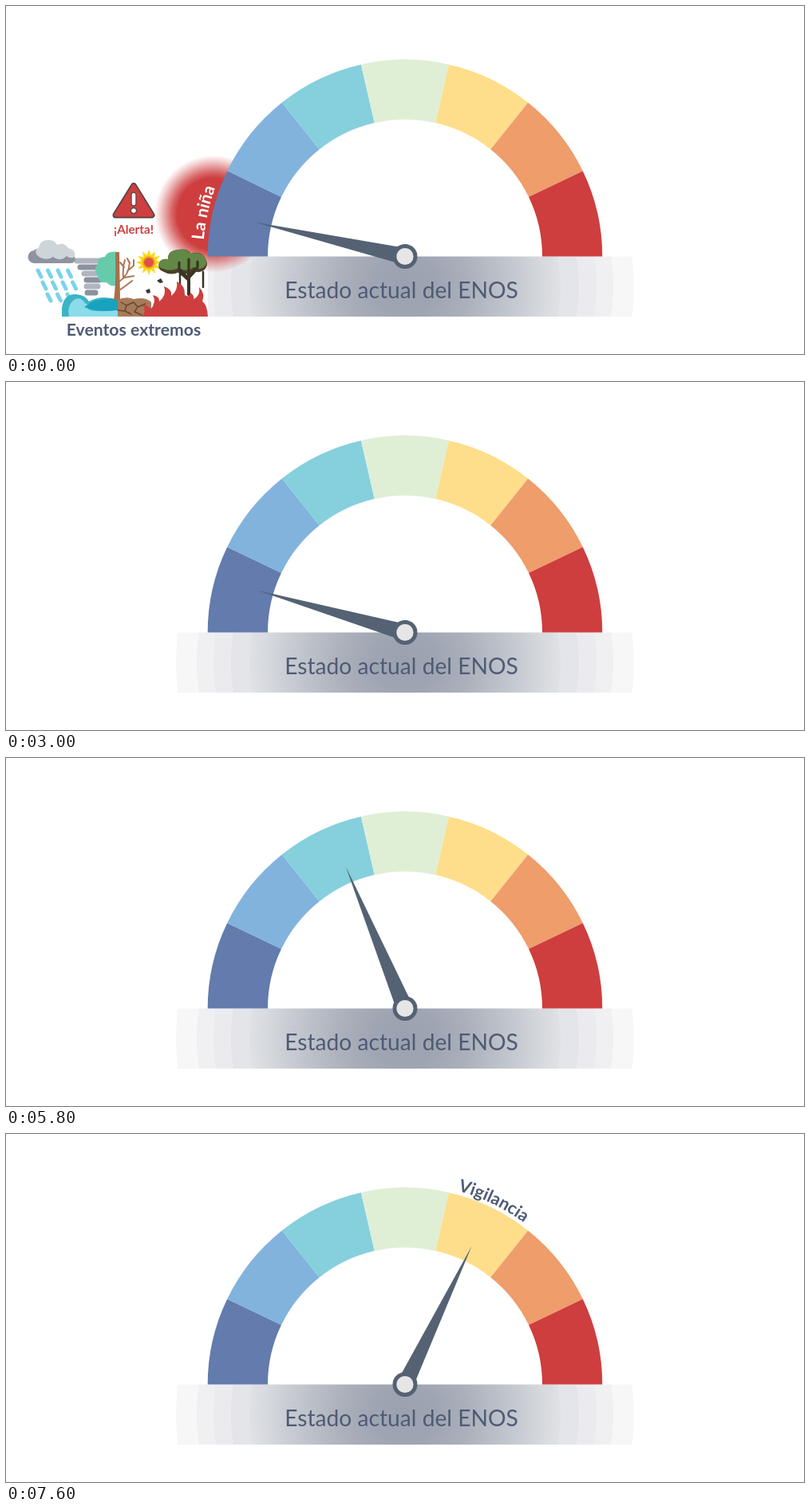
These frames come from a looping animation (1000x437 px, 8000 ms). An HTML page with a canvas:

```html
<!DOCTYPE html>
<html lang="es">
<head>
<meta charset="utf-8">
<title>Estado actual del ENOS</title>
<style>
html, body { margin: 0; width: 100%; height: 100%; overflow: hidden; background: #fff; }
canvas { display: block; width: 1000px; height: 437px; }
</style>
</head>
<body>
<canvas id="stage"></canvas>
<script>
const W = 1000, H = 437, LOOP = 8000;
const CX = 500, CY = 314.5, OUTER = 247.3, INNER = 172;
const SEG = 180 / 7;
const RED = '#ce3e3e', SLATE = '#546273', INK = '#4e5b74';
const COLORS = ['#637bad', '#82b3dd', '#86cfdd', '#dfefd5', '#fede8b', '#ee9d6b', RED];
const FONT = 'Lato, "Open Sans", sans-serif';

const canvas = document.getElementById('stage');
const dpr = window.devicePixelRatio || 1;
canvas.width = W * dpr;
canvas.height = H * dpr;
const ctx = canvas.getContext('2d');
ctx.scale(dpr, dpr);

// Each stop: the needle leaves for the next segment at `leave`.
const STOPS = [
  { leave: 3000, label: 'La niña' },
  { leave: 4400, label: 'Advertencia' },
  { leave: 5800, label: 'Vigilancia' },
  { leave: 7200, label: 'Neutral' },
  { leave: LOOP, label: 'Vigilancia' }
];

const rad = deg => deg * Math.PI / 180;
const segAngle = i => (i - 3) * SEG;

function fill(d, color) {
  ctx.fillStyle = color;
  ctx.fill(new Path2D(d));
}

function stroke(d, color, width) {
  ctx.strokeStyle = color;
  ctx.lineWidth = width;
  ctx.lineCap = ctx.lineJoin = 'round';
  ctx.stroke(new Path2D(d));
}

function disc(x, y, r, color, ry = r) {
  ctx.fillStyle = color;
  ctx.beginPath();
  ctx.ellipse(x, y, r, ry, 0, 0, 2 * Math.PI);
  ctx.fill();
}

function text(str, x, y, size, color, weight) {
  ctx.font = `${weight} ${size}px ${FONT}`;
  ctx.fillStyle = color;
  ctx.textAlign = 'center';
  ctx.fillText(str, x, y);
}

function arcText(str, deg, color, size = 21.6, r = 252) {
  ctx.font = `700 ${size}px ${FONT}`;
  ctx.fillStyle = color;
  ctx.textAlign = 'center';
  const total = ctx.measureText(str).width;
  [...str].forEach((ch, i) => {
    const end = ctx.measureText(str.slice(0, i + 1)).width;
    const mid = end - ctx.measureText(ch).width / 2;
    ctx.save();
    ctx.translate(CX, CY);
    ctx.rotate(rad(deg) + (mid - total / 2) / r);
    ctx.fillText(ch, 0, -r);
    ctx.restore();
  });
}

function base() {
  const g = ctx.createRadialGradient(CX, 352, 0, CX, 352, 287);
  const stops = [[0, '#9ca1b0'], [40, '#9fa5b2'], [80, '#abb0bb'], [140, '#c5c9d0'], [170, '#d4d7dc'], [195, '#dfe1e5']];
  stops.forEach(([r, c]) => g.addColorStop(r / 287, c));
  [[195, 218, '#e4e5ea'], [218, 240, '#ebebef'], [240, 261, '#f0f0f2'], [261, 287, '#f7f7f7']].forEach(([a, b, c]) => {
    g.addColorStop(a / 287, c);
    g.addColorStop(b / 287, c);
  });
  ctx.save();
  ctx.beginPath();
  ctx.rect(200, 314.5, 600, 75.5);
  ctx.clip();
  disc(CX, 352, 287, g);
  ctx.restore();
}

function gauge() {
  COLORS.forEach((color, i) => {
    const a = rad(180 + i * SEG), b = rad(180 + (i + 1) * SEG);
    ctx.fillStyle = color;
    ctx.beginPath();
    ctx.arc(CX, CY, OUTER, a, b);
    ctx.arc(CX, CY, INNER, b, a, true);
    ctx.fill();
  });
}

function needle(deg) {
  ctx.save();
  ctx.translate(CX, CY);
  ctx.rotate(rad(deg));
  fill('M-10.5 0L0-193L10.5 0Z', SLATE);
  ctx.restore();
  disc(CX, CY, 15.5, SLATE);
  disc(CX, CY, 10.6, '#e6e6e6');
}

function glow() {
  const x = 260, y = 261, r = 73;
  const g = ctx.createRadialGradient(x, y, 0, x, y, r);
  [[0, 1], [.62, 1], [.72, .78], [.82, .5], [.92, .22], [1, .03]].forEach(([p, a]) =>
    g.addColorStop(p, `rgba(206,62,62,${a})`));
  disc(x, y, r, g);
}

function alertSign() {
  const tri = 'M160 226L182.500 262.500H137.500Z';
  stroke(tri, '#514447', 8);
  stroke(tri, RED, 4.600);
  fill(tri, RED);
  stroke('M160 237V248', '#514447', 7);
  disc(160, 257, 4, '#514447');
  stroke('M160 237V248', '#fff', 4.600);
  disc(160, 257, 2.800, '#fff');
  text('¡Alerta!', 160, 285.500, 15.200, RED, 700);
}

function storm() {
  // tornado
  [[106, 320, 20], [106, 328, 16], [108, 336, 13], [109, 344, 11], [108, 352, 10], [107, 360, 8]].forEach(([x, y, w], i) => {
    stroke(`M${x - w + 3} ${y}H${x + w - 3}`, i % 2 ? '#8b91a0' : '#b0b5bf', 7);
  });
  // cloud
  fill('M36 323A8 8 0 0 1 35 307Q39 303 44 306Q52 301 60 307Q70 305 75 312Q85 311 87 317Q87 323 80 323Z', '#8e949f');
  fill('M40 314Q34 308 41 303Q43 294 52 294Q61 293 64 300Q73 296 78 304Q88 306 86 315Q81 318 76 314Q67 322 59 315Q50 321 40 314Z', '#cdd5d9');
  // rain
  for (let row = 0; row < 3; row++) {
    for (let i = 0; i < 4 - (row === 2); i++) {
      const x = 40 + row * 6 + i * 12.5, y = 332 + row * 15;
      stroke(`M${x} ${y}l4 8`, '#7bd3ea', 5);
    }
  }
}

function flood() {
  fill('M70 390V380Q72 361 88 362Q100 363 104 371Q120 362 140 369V390Z', '#3db4c6');
  fill('M79 390Q76 374 87 368Q94 365 99 373Q107 377 102 380Q111 386 140 381V390Z', '#8bdbea');
  fill('M98 378Q112 365 140 368V382Q115 385 98 378Z', '#17a3bd');
}

function halfTree() {
  fill('M140 309Q127 307 124 315Q114 315 115 325Q108 331 115 338Q116 349 126 347Q132 354 140 350Z', '#66cbab');
  fill('M137 309H142L143 369H135Q138 350 137 309Z', '#a96f4b');
  stroke('M142 346Q154 338 155 322M147 342Q146 328 149 319M153 332L160 326V319M148 328L143 322M142 357Q152 350 158 345M155 323L152 317M149 341L160 339', '#b07550', 2);
  fill('M140 369Q150 364 160 368Q175 365 182 372V390H140Z', '#a77b59');
  stroke('M144 372L151 376L149 383L157 387M151 376L160 372L165 378L175 374M165 378L161 384L170 388M140 382L149 383', '#65452f', 1.400);
}

function sun() {
  ctx.fillStyle = '#fbd914';
  ctx.beginPath();
  for (let i = 0; i < 24; i++) {
    const r = i % 2 ? 9.5 : 16, a = i * Math.PI / 12;
    ctx.lineTo(179 + r * Math.cos(a), 322 + r * Math.sin(a));
  }
  ctx.fill();
  disc(179, 322, 8, '#f4a81d');
  disc(179, 322, 6, '#de5148');
}

function fire() {
  stroke('M229 362V325M229 344L217 333M229 341L239 330', '#3a3423', 4);
  stroke('M218 350V333M247 353V334', '#3a3423', 2.500);
  fill('M198 334Q189 331 192 323Q194 317 203 318Q202 307 216 306Q227 304 232 311Q244 307 249 316Q255 324 249 331Q242 337 235 332Q226 340 217 334Q207 339 198 334Z', '#4d3f27');
  fill('M197 330Q189 328 192 322Q195 317 203 318Q203 307 216 306Q227 305 232 311Q244 308 249 316Q254 323 248 328Q242 332 235 328Q226 335 217 329Q206 334 197 330Z', '#628846');
  stroke('M229 362V318M229 342L217 331V322M229 339L240 328V321', '#3a3423', 3.200);
  fill('M170 390Q176 384 172 376Q180 376 181 381Q189 372 184 363Q193 365 192 371Q202 363 198 352Q209 356 207 364Q216 357 214 346Q225 351 224 363Q230 367 231 360Q236 363 235 368Q244 364 242 353Q250 361 246 371Q252 374 253 390Z', RED);
  fill('M175 357L180 355L181 360L177 361ZM189 345L194 342L197 347L193 348Z', '#3a3434');
}

function laNina(blink) {
  ctx.fillStyle = '#fff';
  ctx.fillRect(200, 314, 53, 77);
  glow();
  gauge();
  arcText('La niña', -77.7, '#fff', 21.4, 253);
  storm();
  flood();
  halfTree();
  sun();
  fire();
  text('Eventos extremos', 160, 414, 21.2, INK, 700);
  if (blink) alertSign();
}

// The needle advances in five 100 ms steps, eased at both ends.
function progress(ms) {
  const t = Math.min(1, (Math.floor(ms / 100) + 1) / 5);
  return (t + 5 * t * t * (3 - 2 * t)) / 6;
}

function draw(t) {
  let i = 0, p = 0;
  while (i < STOPS.length - 1 && t >= STOPS[i].leave) {
    p = progress(t - STOPS[i].leave);
    i++;
  }
  const arrived = i === 0 || p === 1;
  const angle = i === 0 ? segAngle(0) : segAngle(i - 1) + p * SEG;

  ctx.fillStyle = '#fff';
  ctx.fillRect(0, 0, W, H);
  base();
  if (i === 0) laNina(t % 1000 < 500);
  else {
    gauge();
    if (arrived) arcText(STOPS[i].label, segAngle(i), INK);
  }
  text('Estado actual del ENOS', 495.5, 367, 28.2, INK, 400);
  needle(angle);
}

const start = performance.now();
function tick() {
  draw((performance.now() - start) % LOOP);
  requestAnimationFrame(tick);
}
tick();
</script>
</body>
</html>
```
